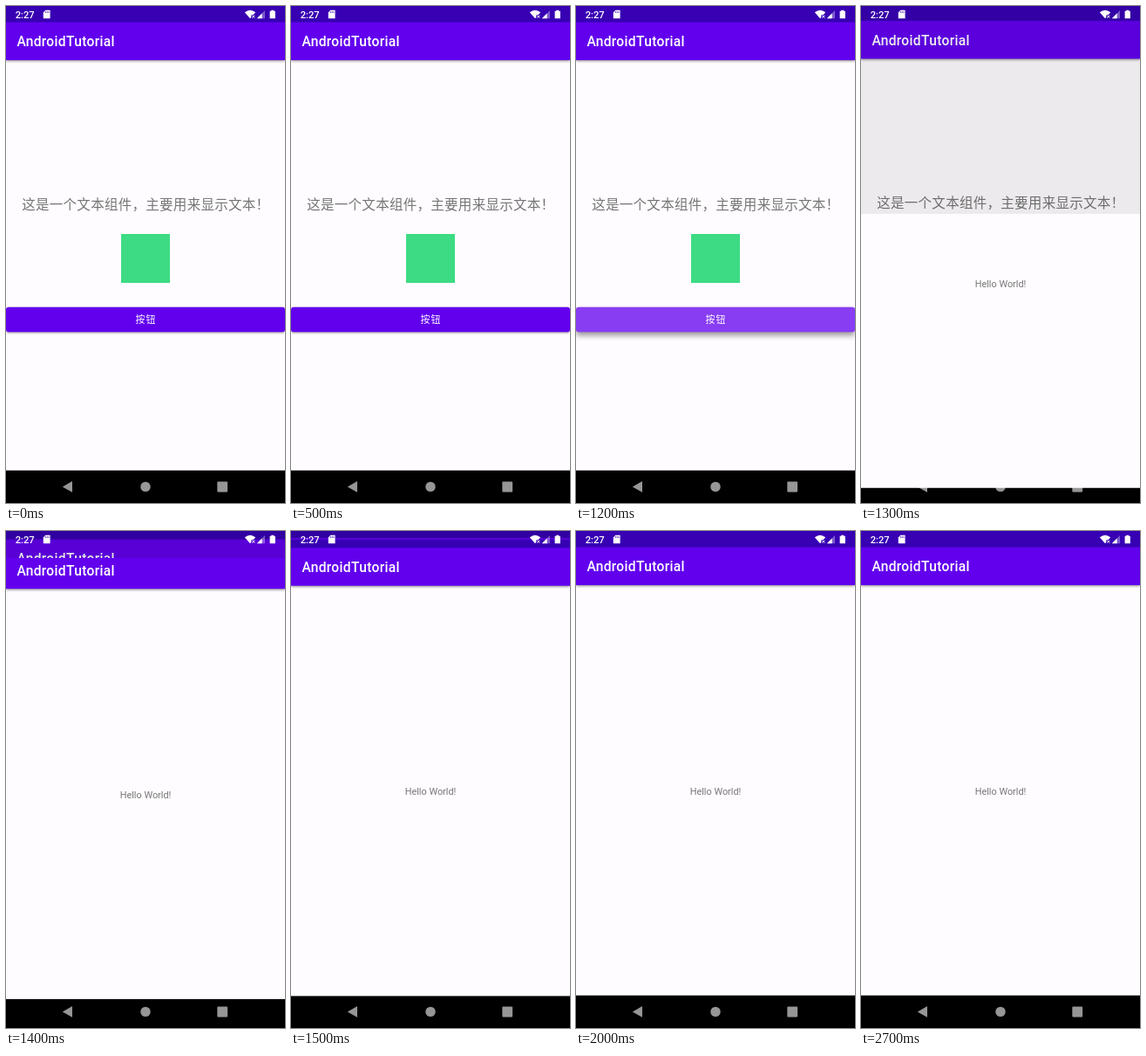
These frames come from a looping animation (320 by 569 pixels, 2800 ms). An HTML page:

```html
<!DOCTYPE html>
<html lang="zh">
<head>
<meta charset="utf-8">
<style>
  html, body { margin: 0; width: 100%; height: 100%; overflow: hidden; background: #000; }
  svg { display: block; width: 100%; height: 100%; }
  text { font-family: Roboto, "Noto Sans CJK SC", "Noto Sans CJK", sans-serif; }
  .mid { text-anchor: middle; }
  .body { fill: #757575; }
  .bold { fill: #fff; font-weight: 500; }
  #bar { filter: drop-shadow(0 1px 1.5px #0007); }
</style>
</head>
<body>
<svg viewBox="0 0 320 569">
  <defs>
    <clipPath id="reveal"><rect id="mask" width="320" height="569"/></clipPath>
    <clipPath id="shape"><rect y="344.8" width="320" height="28.4" rx="3"/></clipPath>
    <g id="screen">
      <rect width="320" height="531.7" fill="#fffcff"/>
      <rect id="bar" y="-12" width="320" height="74" fill="#6200ee"/>
      <rect y="-12" width="320" height="30.6" fill="#3700b3"/>
      <text class="bold" x="12.4" y="46.4" font-size="15.6" letter-spacing=".31">AndroidTutorial</text>
    </g>
  </defs>

  <!-- navigation keys -->
  <g fill="#969696">
    <path d="M64.8 550.4 76 544V556.8Z"/>
    <circle cx="160" cy="550.4" r="5.7"/>
    <rect x="242.3" y="544.6" width="11.8" height="11.8" rx=".8"/>
  </g>

  <g id="first">
    <use href="#screen"/>
    <text class="body mid" x="160.3" y="232.8" font-size="15.56" letter-spacing=".24">这是一个文本组件，主要用来显示文本！</text>
    <rect x="132" y="261" width="56" height="56" fill="#3ddc84"/>
    <rect id="button" y="344.8" width="320" height="28.4" rx="3" fill="#6200ee"/>
    <circle id="ripple" cx="151.5" cy="359" fill="#fff" fill-opacity=".24" clip-path="url(#shape)"/>
    <text class="bold mid" x="160.4" y="363.1" font-size="10.9" letter-spacing=".97">按钮</text>
  </g>
  <rect id="dim" width="320" height="532"/>

  <g id="layer" clip-path="url(#reveal)">
    <g id="second">
      <use href="#screen"/>
      <text class="body mid" x="160" y="301.7" font-size="10.9">Hello World!</text>
    </g>
  </g>

  <!-- status icons -->
  <g fill="#fff">
    <text class="bold" x="10.7" y="13.7" font-size="11.2">2:27</text>
    <path d="M45.3 4.8H50.6V14.2H42.8V7.5Z"/>
    <path d="M45.4 6V8M47.2 6V8M49 6V8" stroke="#3700b3" stroke-width=".7"/>
    <path d="M273.8 7.2Q280 2.2 286.2 7.2L283.6 10.3H281.3V12.8L280 14.3Z"/>
    <path d="M282.3 10.8 285.2 13.7M285.2 10.8 282.3 13.7" stroke="#fff"/>
    <path d="M287.8 14.2 297 5V14.2Z" opacity=".35"/>
    <path d="M287.8 14.2 293.6 8.4V14.2Z"/>
    <path d="M304.2 4.8H307.2V5.7H308.8V14.2H302.6V5.7H304.2Z"/>
  </g>
</svg>
<script>
  const LOOP = 2800, STEP = 100, PRESS = 1100, OPEN = 1210;
  const $ = id => document.getElementById(id);
  const set = (id, name, value) => $(id).setAttribute(name, value);

  // Linear interpolation through [time, value] points
  function along(points, t) {
    let [t0, v0] = points[0];
    for (const [t1, v1] of points) {
      if (t <= t1) return t1 > t0 ? v0 + (v1 - v0) * (t - t0) / (t1 - t0) : v1;
      [t0, v0] = [t1, v1];
    }
    return v0;
  }

  const slide = [[0, 0], [90, .14], [190, .82], [290, .97], [390, 1]];
  const wipe = [[0, 569], [90, 238], [190, 31], [290, 10], [390, 0]];

  function draw(now) {
    const t = Math.floor(now % LOOP / STEP) * STEP;
    const pressed = t >= PRESS, age = t - OPEN, p = along(slide, Math.max(age, 0));
    set('ripple', 'r', pressed ? 131.5 + (t - PRESS) * 1.2 : 0);
    $('button').style.filter = pressed
      ? 'drop-shadow(0 4px 3px #0006)' : 'drop-shadow(0 1px 1px #0006)';
    set('first', 'transform', `translate(0 ${-11 * p})`);
    set('dim', 'opacity', .1 * Math.min(1, Math.max(0, age / 125)));
    set('layer', 'visibility', age > 0 ? 'visible' : 'hidden');
    set('mask', 'y', along(wipe, Math.max(age, 0)));
    set('second', 'transform', `translate(0 ${23.3 * (1 - p)})`);
    requestAnimationFrame(draw);
  }
  draw(0);
</script>
</body>
</html>
```
